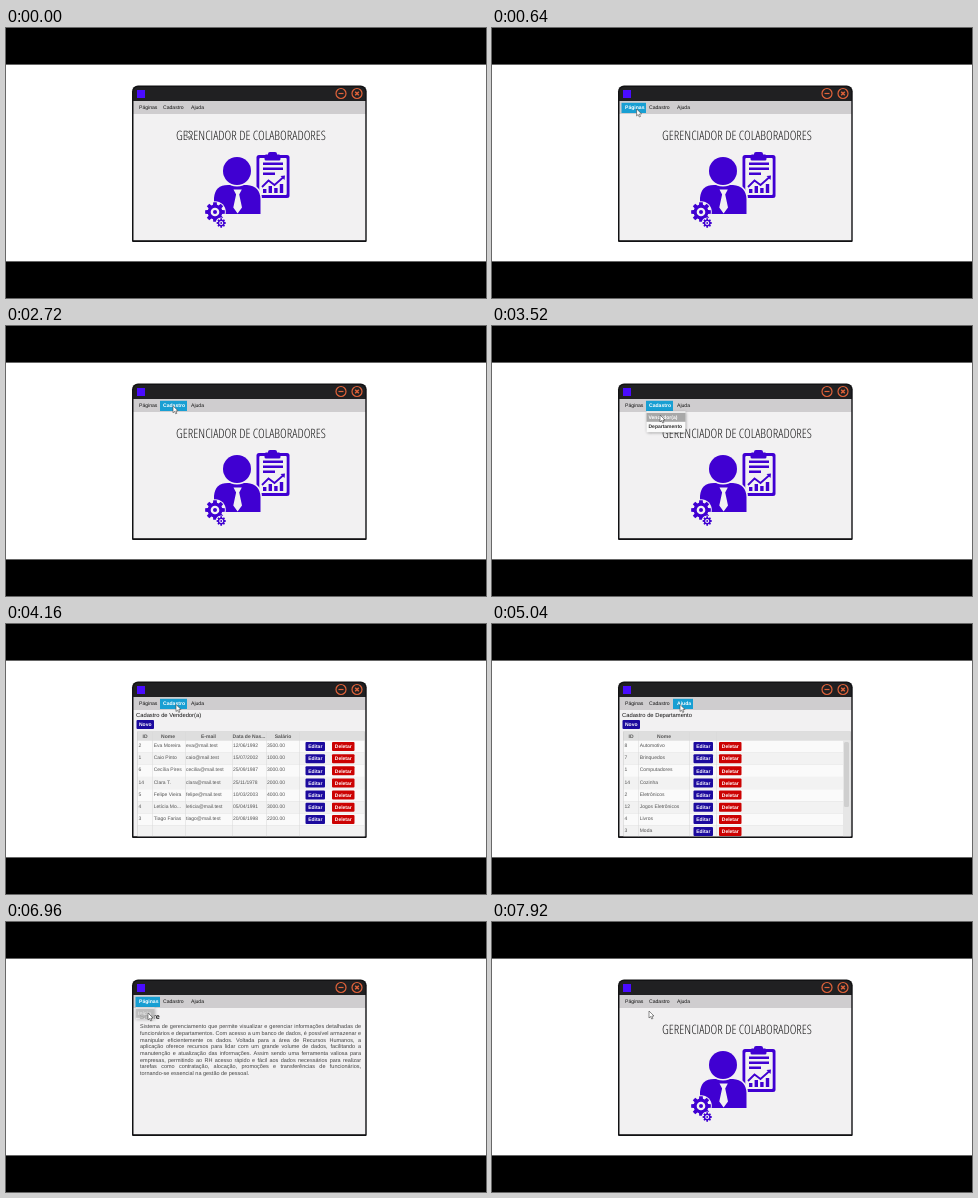
Recreate the animation shown at these times as an HTML page with a canvas. Size 480 by 270 pixels, loop 8 s.

```html
<!DOCTYPE html>
<html lang="pt-BR">
<head>
<meta charset="utf-8">
<title>Gerenciador de Colaboradores</title>
<style>
html, body { margin: 0; width: 100%; height: 100%; overflow: hidden; background: #000; }
canvas { display: block; width: 480px; height: 270px; }
</style>
</head>
<body>
<canvas id="stage"></canvas>
<script>
const LOOP = 8000;
const PURPLE = '#4000d2', NAVY = '#1c0a9e', RED = '#cc0202', PAPER = '#f2f1f2', BLUE = '#189fd3';
const SANS = '"Liberation Sans", Arial, sans-serif';

const canvas = document.getElementById('stage');
const ctx = canvas.getContext('2d');
const dpr = window.devicePixelRatio || 1;
canvas.width = 480 * dpr;
canvas.height = 270 * dpr;
ctx.textRendering = 'geometricPrecision';

function rect(x, y, w, h, fill) {
  ctx.fillStyle = fill;
  ctx.fillRect(x, y, w, h);
}

function round(x, y, w, h, r, fill) {
  ctx.beginPath();
  ctx.roundRect(x, y, w, h, r);
  ctx.fillStyle = fill;
  ctx.fill();
}

function disc(x, y, r, fill) {
  ctx.beginPath();
  ctx.arc(x, y, r, 0, Math.PI * 2);
  ctx.fillStyle = fill;
  ctx.fill();
}

function poly(points, fill) {
  ctx.beginPath();
  points.forEach(([x, y]) => ctx.lineTo(x, y));
  ctx.closePath();
  ctx.fillStyle = fill;
  ctx.fill();
}

function line(points, color, width) {
  ctx.beginPath();
  points.forEach(([x, y]) => ctx.lineTo(x, y));
  ctx.strokeStyle = color;
  ctx.lineWidth = width;
  ctx.stroke();
}

// y is the vertical centre of the line
function text(str, x, y, { size = 5, weight = 400, color = '#333', align = 'left' } = {}) {
  ctx.font = `${weight} ${size}px ${SANS}`;
  ctx.fillStyle = color;
  ctx.textAlign = align;
  ctx.fillText(str, x, y + size * 0.36);
}

function button(label, x, y, w, fill) {
  round(x, y, w, 9, 1, fill);
  text(label, x + w / 2, y + 4.5, { weight: 700, color: '#fff', align: 'center' });
}

// Narrowest installed light face for the tall heading
const HEADING = 'GERENCIADOR DE COLABORADORES';
const headingFont = (() => {
  const faces = ['Open Sans Condensed Light', 'Open Sans', 'Noto Sans', 'Roboto Condensed', 'Roboto']
    .map(face => size => `300 extra-condensed ${size}px "${face}", sans-serif`);
  const measured = faces.map(font => {
    ctx.font = font(10);
    return { font, width: ctx.measureText(HEADING).width };
  });
  const best = measured.reduce((a, b) => (b.width < a.width ? b : a));
  const size = Math.min(13.4, 10 * 150 / best.width);
  return { css: best.font(size), size };
})();

function gear(x, y, r, teeth) {
  const points = [];
  for (let i = 0; i < teeth; i++) {
    [[-0.46, 0.74], [-0.3, 1], [0.3, 1], [0.46, 0.74]].forEach(([offset, k]) => {
      const a = (i + offset * 0.75) / teeth * Math.PI * 2;
      points.push([x + Math.cos(a) * r * k, y + Math.sin(a) * r * k]);
    });
  }
  disc(x, y, r + 0.8, PAPER);
  poly(points, PURPLE);
  disc(x, y, r * 0.43, PAPER);
  disc(x, y, r * 0.2, PURPLE);
}

function clipboard() {
  round(250.5, 127, 33, 43, 2.5, PURPLE);
  round(253.3, 130, 27.4, 37, 1, PAPER);
  round(258.5, 126.5, 16, 6, 1.5, PURPLE);
  round(262, 124, 9, 6, 2, PURPLE);
  rect(257, 134.5, 20, 2.5, PURPLE);
  rect(257, 139.5, 20, 2.5, PURPLE);
  rect(257, 144.5, 12, 2.5, PURPLE);
  line([[256, 159], [262.5, 152.5], [268.5, 157], [277, 149.5]], PURPLE, 1.8);
  poly([[279, 147.5], [278.5, 152], [274.5, 148]], PURPLE);
  [4, 7, 5, 9].forEach((h, i) => rect(257 + i * 5.6, 165 - h, 3.4, h, PURPLE));
}

function person() {
  ctx.beginPath();
  ctx.moveTo(208, 186);
  ctx.lineTo(208, 170);
  ctx.quadraticCurveTo(209, 157, 222, 157);
  ctx.lineTo(241, 157);
  ctx.quadraticCurveTo(254, 158, 254.5, 171);
  ctx.lineTo(254.5, 186);
  ctx.closePath();
  ctx.fillStyle = PURPLE;
  ctx.strokeStyle = PAPER;
  ctx.lineWidth = 3;
  ctx.stroke();
  ctx.fill();
  disc(231, 143, 15.5, PAPER);
  disc(231, 143, 14, PURPLE);
  poly([[227.5, 161.5], [235.8, 161.5], [233.2, 166.5], [236, 179.5], [231.6, 185.5], [227.3, 179.5], [230.1, 166.5]], PAPER);
}

function homePage() {
  ctx.font = headingFont.css;
  ctx.fillStyle = '#161616';
  ctx.textAlign = 'center';
  ctx.fillText(HEADING, 245, 107.5 + headingFont.size * 0.36);
  clipboard();
  person();
  gear(209, 184, 10, 8);
  gear(215.2, 195, 4.7, 8);
}

function tablePage({ title, heads, dividers, columns, rows, edit, remove, scroll }) {
  text(title, 130, 91, { size: 5.8, color: '#111' });
  button('Novo', 130.5, 96, 17.5, NAVY);
  rect(131, 107.5, 228, 105, '#c9c9c9');
  rect(131.5, 108, 227, 8.5, '#dedede');
  heads.forEach(([label, x]) => text(label, x, 112.3, { weight: 700, color: '#555', align: 'center' }));
  for (let i = 0; i < 8; i++) {
    const y = 116.5 + i * 12.15;
    rect(131.5, y, 227, 12.15, i % 2 ? '#f2f2f2' : '#fafafa');
    const row = rows[i];
    if (!row) continue;
    row.forEach((cell, c) => text(cell, columns[c], y + 4.8, { color: '#555' }));
    button('Editar', edit, y + 1.5, 19.5, NAVY);
    button('Deletar', remove, y + 1.5, 22.5, RED);
  }
  dividers.forEach(x => rect(x, 108, 0.5, 104.5, '#d8d8d8'));
  if (scroll) {
    rect(351, 116.5, 7.5, 96, '#e6e6e6');
    round(352, 118, 5, 65, 1.5, '#cfcfcf');
  }
}

const sellers = {
  title: 'Cadastro de Vendedor(a)',
  heads: [['ID', 139], ['Nome', 162], ['E-mail', 202.5], ['Data de Nas...', 243], ['Salário', 277]],
  dividers: [146.5, 179, 226, 260, 293],
  columns: [132.5, 147.7, 180, 227, 261],
  edit: 299.5,
  remove: 326,
  rows: [
    ['2', 'Eva Moreira', 'eva', '12/06/1992', '3500.00'],
    ['1', 'Caio Pinto', 'caio', '15/07/2002', '1000.00'],
    ['6', 'Cecília Pires', 'cecilia', '25/09/1987', '3000.00'],
    ['14', 'Clara T.', 'clara', '25/11/1978', '2000.00'],
    ['5', 'Felipe Vieira', 'felipe', '10/03/2003', '4000.00'],
    ['4', 'Letícia Mo...', 'leticia', '05/04/1991', '3000.00'],
    ['3', 'Tiago Farias', 'tiago', '20/08/1998', '2200.00'],
  ].map(([id, name, user, ...rest]) => [id, name, user + '@mail.test', ...rest]),
};

const departments = {
  title: 'Cadastro de Departamento',
  heads: [['ID', 139], ['Nome', 172]],
  dividers: [146.5, 197, 224.5],
  columns: [132.5, 147.7],
  edit: 201.5,
  remove: 227,
  scroll: true,
  rows: [['8', 'Automotivo'], ['7', 'Brinquedos'], ['1', 'Computadores'], ['14', 'Cozinha'],
    ['2', 'Eletrônicos'], ['12', 'Jogos Eletrônicos'], ['4', 'Livros'], ['3', 'Moda']],
};

const ABOUT = [
  'Sistema de gerenciamento que permite visualizar e gerenciar informações detalhadas de',
  'funcionários e departamentos. Com acesso a um banco de dados, é possível armazenar e',
  'manipular eficientemente os dados. Voltada para a área de Recursos Humanos, a',
  'aplicação oferece recursos para lidar com um grande volume de dados, facilitando a',
  'manutenção e atualização das informações. Assim sendo uma ferramenta valiosa para',
  'empresas, permitindo ao RH acesso rápido e fácil aos dados necessários para realizar',
  'tarefas como contratação, alocação, promoções e transferências de funcionários,',
  'tornando-se essencial na gestão de pessoal.',
];

function aboutPage() {
  text('Sobre', 133.5, 94, { size: 7.2, weight: 700, color: '#222' });
  const size = 5.5;
  ABOUT.forEach((str, i) => {
    const y = 104.3 + i * 6.68;
    const words = str.split(' ');
    ctx.font = `400 ${size}px ${SANS}`;
    const widths = words.map(w => ctx.measureText(w).width);
    const free = 221 - widths.reduce((a, b) => a + b, 0);
    const gap = i === ABOUT.length - 1 ? size * 0.278 : free / (words.length - 1);
    let x = 134;
    words.forEach((w, n) => {
      text(w, x, y, { size, color: '#444' });
      x += widths[n] + gap;
    });
  });
}

const pages = [
  [0, homePage],
  [3760, () => tablePage(sellers)],
  [4720, () => tablePage(departments)],
  [5690, aboutPage],
  [7000, homePage],
];

const tabs = [
  { label: 'Páginas', x: 133, left: 129.5, width: 24.5, menu: 18.5, items: ['Início'] },
  { label: 'Cadastro', x: 157, left: 154, width: 27, menu: 39, items: ['Vendedor(a)', 'Departamento'] },
  { label: 'Ajuda', x: 185, left: 181, width: 20, menu: 20, items: ['Sobre'] },
];

// tab lit from..to, its menu shown open..shut
const visits = [
  { tab: 0, from: 600, to: 2060, open: 1000, shut: 1900 },
  { tab: 1, from: 2060, to: 3780, open: 2880, shut: 3700 },
  { tab: 1, from: 3980, to: 4840, open: 4400, shut: 4680 },
  { tab: 2, from: 4920, to: 5740, open: 5200, shut: 5680 },
  { tab: 0, from: 6560, to: 7080, open: 6700, shut: 6900 },
];

// time, x, y of the pointer tip
const path = [
  [0, 181, 103], [80, 181, 103], [720, 143, 80], [1520, 140.5, 80], [1840, 140.5, 80],
  [2320, 167, 79.8], [3280, 167, 79.8], [3520, 168, 89], [3780, 168, 90], [4080, 170, 80.5],
  [4440, 170, 80.5], [4620, 171, 99], [4740, 171, 99], [5000, 188, 80.5], [5280, 188, 80.5],
  [5440, 189, 89], [5720, 189, 89], [6560, 142, 80], [6720, 141, 80], [6860, 142, 91],
  [7000, 142, 91], [7360, 161, 104], [7840, 157, 89], [8000, 157, 89],
];

const clamp = v => Math.max(0, Math.min(1, v));

function pointer(t) {
  const i = path.findIndex(p => p[0] > t);
  const [t0, x0, y0] = path[i - 1], [t1, x1, y1] = path[i];
  const u = (t - t0) / (t1 - t0);
  const k = u * u * (3 - 2 * u);
  return [x0 + (x1 - x0) * k, y0 + (y1 - y0) * k];
}

function drawPointer([x, y]) {
  const shape = [[0, 0], [0, 7], [1.6, 5.5], [2.7, 8], [3.9, 7.5], [2.8, 5.1], [5, 5]]
    .map(([dx, dy]) => [x + dx, y + dy]);
  poly(shape, '#fff');
  line([...shape, shape[0]], '#444', 0.6);
}

function drawMenu(tab, alpha, [px, py]) {
  const height = tab.items.length * 9 + 3;
  ctx.save();
  ctx.globalAlpha = alpha;
  ctx.shadowColor = 'rgba(0,0,0,.5)';
  ctx.shadowBlur = 3 * dpr;
  ctx.shadowOffsetY = dpr;
  rect(tab.left + 0.5, 85.3, tab.menu, height, '#fafafa');
  ctx.shadowColor = 'transparent';
  tab.items.forEach((item, i) => {
    const y = 86.8 + i * 9;
    const over = py >= y && py < y + 9;
    if (over) rect(tab.left + 0.5, y, tab.menu, 9, '#a8a8a8');
    text(item, tab.left + 2.5, y + 4.3, { weight: 700, color: over ? '#fff' : '#333' });
  });
  ctx.restore();
}

function drawWindow(t, tip) {
  round(126, 57.6, 234.7, 156.4, [6, 6, 1, 1], '#111113');
  round(127.3, 59, 232, 14, [5, 5, 0, 0], '#202022');
  rect(131, 62, 8, 8, '#4a0cff');
  [335, 351].forEach(x => {
    ctx.beginPath();
    ctx.arc(x, 65.5, 5, 0, Math.PI * 2);
    ctx.strokeStyle = '#e0623a';
    ctx.lineWidth = 1.2;
    ctx.stroke();
  });
  line([[332.5, 65.5], [337.5, 65.5]], '#e0623a', 1.2);
  line([[349.2, 63.7], [352.8, 67.3]], '#e0623a', 1.5);
  line([[352.8, 63.7], [349.2, 67.3]], '#e0623a', 1.5);

  rect(127.5, 73, 231.8, 13, '#cfcdcf');
  rect(127.5, 86, 231.8, 126.2, PAPER);
  ctx.save();
  ctx.beginPath();
  ctx.rect(127.5, 86, 231.8, 126.2);
  ctx.clip();
  pages.filter(p => p[0] <= t).pop()[1]();
  ctx.restore();

  const visit = visits.find(v => t >= v.from && t < v.to);
  tabs.forEach((tab, i) => {
    const lit = visit && visit.tab === i;
    if (lit) rect(tab.left, 74.8, tab.width, 10.2, BLUE);
    text(tab.label, tab.x, 79.4, { size: 5.1, weight: lit ? 700 : 400, color: lit ? '#fff' : '#111' });
  });
  if (visit) {
    const alpha = Math.min(clamp((t - visit.open) / 100), 1 - clamp((t - visit.shut) / 160));
    if (alpha > 0) drawMenu(tabs[visit.tab], alpha, tip);
  }
}

function draw() {
  const t = performance.now() % LOOP;
  const tip = pointer(t);
  ctx.setTransform(dpr, 0, 0, dpr, 0, 0);
  rect(0, 0, 480, 270, '#000');
  rect(0, 36.6, 480, 196.8, '#fff');
  drawWindow(t, tip);
  drawPointer(tip);
  requestAnimationFrame(draw);
}

draw();
</script>
</body>
</html>
```
